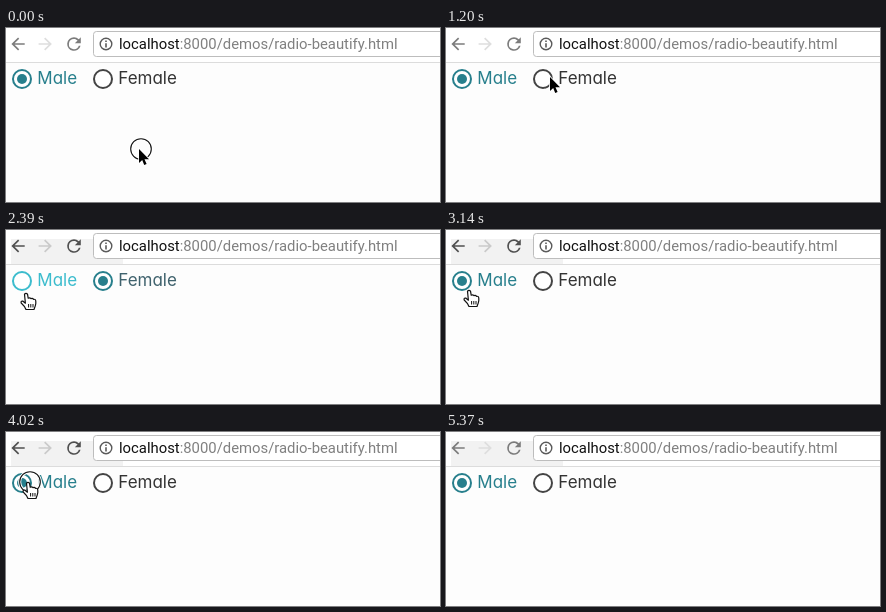
These frames come from a looping animation (434x174 px, 5.82 s). An HTML page:

```html
<!DOCTYPE html>
<html lang="en">
<head>
<meta charset="utf-8">
<title>Radio beautify</title>
<style>
  html, body { margin: 0; height: 100%; overflow: hidden; background: #fdfdfd; }
  svg { display: block; width: 434px; height: 174px; }
  .url { font: 14.85px Roboto, sans-serif; fill: #808080; }
  .label { font: 17px Inter, "Open Sans", sans-serif; font-feature-settings: "cv11", "ss01"; }
</style>
</head>
<body>
<svg viewBox="0 0 434 174">
  <rect width="434" height="34" fill="#fff"/>
  <rect id="shade" x="5" y="9" width="112" height="25" fill="#f2f2f2"/>
  <path d="M0 34.5H434" stroke="#dcdcdc"/>
  <g id="icons">
    <path id="back" transform="translate(2.1 6.4) scale(.83 .8)" d="M20 11H7.83l5.59-5.59L12 4l-8 8 8 8 1.41-1.41L7.83 13H20z"/>
    <path id="next" transform="translate(49.2 6.4) scale(-.83 .8)" d="M20 11H7.83l5.59-5.59L12 4l-8 8 8 8 1.41-1.41L7.83 13H20z"/>
    <path transform="translate(57.8 5.8) scale(.85)" d="M17.65 6.35A7.95 7.95 0 0 0 12 4a8 8 0 1 0 7.73 10h-2.08A6 6 0 1 1 12 6c1.66 0 3.14.69 4.22 1.78L13 11h7V4z"/>
  </g>
  <rect x="87.5" y="3.5" width="360" height="25" rx="3" fill="#fff" stroke="#bdbdbd"/>
  <circle cx="100" cy="16" r="5.8" fill="none" stroke="#5a5a5a" stroke-width="1.4"/>
  <path d="M100 12.6v1.5M100 15.2v4.2" stroke="#5a5a5a" stroke-width="1.6"/>
  <text class="url" x="113" y="21"><tspan fill="#111">localhost</tspan>:8000/demos/radio-beautify.html</text>
  <g id="radios"></g>
  <g id="ring" fill="none">
    <circle r="10.3" stroke="#fff" stroke-width="3"/>
    <circle r="10.3" stroke="#111" stroke-width="1.1"/>
  </g>
  <g id="cursor">
    <path id="arrow" d="M0 0V14L3.2 11 5.2 16 7.6 15 5.5 10.2H10Z" stroke="#fff" paint-order="stroke" stroke-width="1.6"/>
    <g id="hand" fill="#fff" stroke="#111" stroke-linejoin="round">
      <path stroke-width="1.2" d="M-1.5 1.2Q0-.6 1.5 1.2L2.2 5.2Q3.8 4.3 5 5.6Q6.6 4.9 7.6 6.3Q9.8 6 9.8 8.5V10.5Q9.5 13 8 16.5H0Q-1 13.5-4.8 10Q-5.5 7.5-3 8.2L-.6 10.2Z"/>
      <path d="M2.6 11v3.5M4.8 11v3.5M7 11v3.5"/>
    </g>
  </g>
</svg>
<script>
const $ = id => document.getElementById(id);
const LOOP = 5820, TEAL = '#277f8c', CYAN = '#3cbccd', DARK = '#444', TEXT = '#333', SLATE = '#3f626d';

// Pointer path: [tick, x, y]
const path = [
  [0, 133, 121], [7, 114, 50], [8, 104, 49], [9, 97, 53], [10, 95, 57], [12, 95, 57],
  [14, 62, 62], [16, 20, 63], [18, 19, 57], [21, 23, 60], [23, 45, 66], [24, 78, 60],
  [25, 91, 49], [26, 62, 55], [27, 22, 50], [28, 24, 43], [29, 94, 106]
];
const presses = [0, 10, 18, 25, 27];

const radios = [['Male', 16], ['Female', 97]].map(([name, x]) => {
  const g = document.createElementNS('http://www.w3.org/2000/svg', 'g');
  g.innerHTML = `<circle cx="${x}" cy="51" r="9" fill="#fff" stroke-width="2"/>
    <circle cx="${x}" cy="51" r="5"/><text class="label" x="${x + 15.3}" y="56">${name}</text>`;
  $('radios').append(g);
  return g.children;
});

const show = (id, on) => $(id).setAttribute('visibility', on ? 'visible' : 'hidden');
const move = (id, x, y) => $(id).setAttribute('transform', `translate(${x} ${y})`);

// The pointer is sampled about every 150 ms, with three short ticks.
function tickAt(t) {
  const lag = [2250, 3280, 3570].filter(s => t >= s).length * 10;
  return Math.floor((t + lag) / 150);
}

function pointer(k) {
  const i = Math.max(1, path.findIndex(p => p[0] >= k));
  const [a, ax, ay] = path[i - 1], [b, bx, by] = path[i];
  const f = (k - a) / (b - a);
  return [ax + (bx - ax) * f, ay + (by - ay) * f];
}

function draw(t) {
  const k = tickAt(t), gone = k > 29;
  const [x, y] = pointer(Math.min(k, 29));
  const over = gone || k < 9 || y > 70 ? -1 : x < 73 ? 0 : x > 84 ? 1 : -1;
  const checked = (k >= 10 && k < 18) || (k >= 25 && k < 27) ? 1 : 0;

  radios.forEach(([outer, dot, label], i) => {
    const on = i === checked, hover = i === over;
    outer.setAttribute('stroke', on ? TEAL : hover ? CYAN : DARK);
    dot.setAttribute('fill', on ? TEAL : 'none');
    label.setAttribute('fill', on ? (i && !hover ? SLATE : TEAL) : hover ? CYAN : TEXT);
  });

  const active = k >= 10 && t < 5370;
  $('icons').setAttribute('fill', active ? '#505050' : '#7c7c7c');
  $('next').setAttribute('fill', active ? '#cacaca' : '#dedede');
  show('shade', k >= 10);

  show('arrow', !gone && over < 0);
  show('hand', !gone && over >= 0);
  show('ring', presses.includes(k));
  move('cursor', x, y);
  move('ring', x + 2, y);
}

const start = performance.now();
function frame() {
  draw((performance.now() - start) % LOOP);
  requestAnimationFrame(frame);
}
frame();
</script>
</body>
</html>
```
